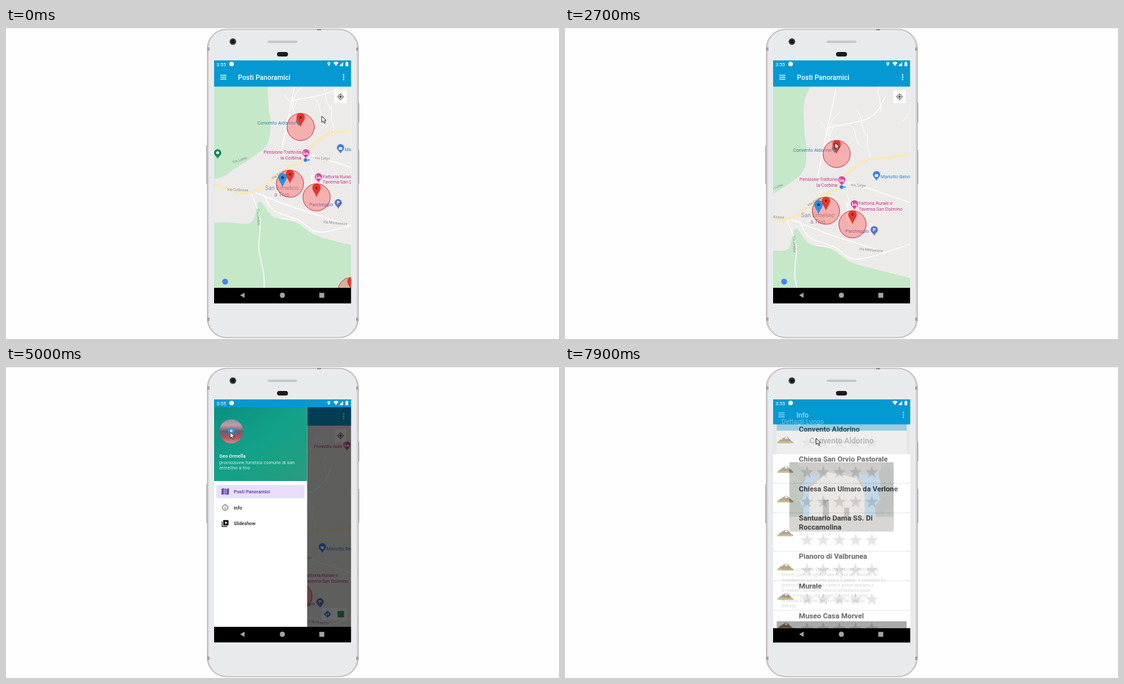
These frames come from a looping animation (853 px wide and 480 px high, 8 s). An HTML page:

```html
<!DOCTYPE html>
<html lang="it">
<head>
<meta charset="utf-8">
<title>Map app</title>
<style>
html, body { margin: 0; width: 100%; height: 100%; overflow: hidden; background: #fefefe; }
svg { display: block; font-family: Roboto, "Liberation Sans", sans-serif; }
.line { fill: none; stroke: #fff; stroke-linejoin: round; stroke-linecap: round; }
.bold { font-weight: 700; }
.mid { font-weight: 500; }
.end { text-anchor: end; }
.center { text-anchor: middle; }
</style>
</head>
<body>
<svg id="stage" width="853" height="480" viewBox="0 0 853 480"></svg>
<script>
const SCREEN = { x: 321, top: 50, bar: 90.5, nav: 401, bottom: 425.3, w: 211.5 };
const MID = { x: 426.5, y: 237.5 };
const BLUE = '#0499d2';
const NAMES = { app: 'Posti Panoramici', first: 'Convento Aldorino' };

const rect = (x, y, w, h, fill, more = '') =>
  `<rect x="${x}" y="${y}" width="${w}" height="${h}" fill="${fill}" ${more}/>`;
const circle = (x, y, r, fill, more = '') =>
  `<circle cx="${x}" cy="${y}" r="${r}" fill="${fill}" ${more}/>`;
const text = (x, y, size, fill, words, cls = '', more = '') =>
  `<text x="${x}" y="${y}" font-size="${size}" fill="${fill}" class="${cls}" ${more}>${words}</text>`;
const path = (d, fill) => `<path d="${d}" fill="${fill}"/>`;
const line = (d, width = 1, stroke = '#fff') =>
  `<path class="line" d="${d}" style="stroke:${stroke};stroke-width:${width}"/>`;
const group = (id, body, more = '') => `<g id="${id}" ${more}>${body}</g>`;
const band = (y, end, fill, more) => rect(SCREEN.x, y, SCREEN.w, end - y, fill, more);
const repeat = (n, make) => Array.from({ length: n }, (_, i) => make(i)).join('');

// Smooth path through a few "x,y" points
function spline(list) {
  const p = list.split(' ').map(s => s.split(',').map(Number));
  const at = i => p[Math.max(0, Math.min(p.length - 1, i))];
  const handle = (i, sign) => at(i).map((v, k) => v + sign * (at(i + 1)[k] - at(i - 1)[k]) / 6);
  return p.map((q, i) => i ? `C${handle(i - 1, 1)} ${handle(i, -1)} ${q}` : `M${q}`).join('');
}

function seeded(seed) {
  return () => (seed = (seed * 16807) % 2147483647) / 2147483647;
}

// Teardrop with its tip at (x, y)
function pin(x, y, r, h, fill) {
  const c = y - h + r;
  return path(`M${x} ${y}C${x - r * .25} ${y - h * .3} ${x - r} ${c + r * .8} ${x - r} ${c}` +
    `A${r} ${r} 0 0 1 ${x + r} ${c}C${x + r} ${c + r * .8} ${x + r * .25} ${y - h * .3} ${x} ${y}Z`, fill);
}

function star(x, y, r) {
  const d = Array.from({ length: 10 }, (_, i) => {
    const a = Math.PI * (i / 5 - .5), s = i % 2 ? r * .42 : r;
    return `${(x + s * Math.cos(a)).toFixed(1)} ${(y + s * Math.sin(a)).toFixed(1)}`;
  });
  return path(`M${d.join('L')}Z`, '#d9d9d9');
}

function phone() {
  const key = (x, y, h) => rect(x, y, 2, h, '#b9b0b2', 'rx="1"');
  return rect(0, 0, 853, 1, '#eeeeee') +
    key(308.8, 181, 60) + key(543, 115, 31) + key(543, 188, 53) +
    rect(310.5, 2, 233, 476, '#d9d3d5', 'rx="29" stroke="#b3abae"') +
    rect(314, 4, 226, 472, '#e8ebed', 'rx="26" stroke="#f3f2f3"') +
    [30, 447].map(y => rect(310, y, 4, 5, '#aaa3a6') + rect(540, y, 4, 5, '#aaa3a6')).join('') +
    rect(480, 1.8, 6, 1.6, '#777') + rect(403.5, 19.5, 46, 3.4, '#c4c6c9', 'rx="1.7"') +
    rect(418, 37, 17, 7, '#1c1c1e', 'rx="3.5"') +
    circle(350, 21, 5.2, '#54565a') + circle(350, 21, 3.5, '#17181b');
}

function land() {
  const green = '#c4e8c8', rnd = seeded(42);
  const lanes = repeat(14, () => {
    let x = 400 + rnd() * 160, y = 10 + rnd() * 290, a = rnd() * 6.3;
    const points = [];
    for (let i = 0; i < 5; i++) {
      points.push(`${x.toFixed(1)},${y.toFixed(1)}`);
      a += rnd() - .5;
      x += 11 * Math.cos(a);
      y += 11 * Math.sin(a);
    }
    return line(spline(points.join(' ')), 1);
  });
  const streets = [
    '378,255 392,295 390,340 398,385 397,440',
    '397,256 412,281 450,296 488,315 568,292',
    '385,254 430,272 478,288 530,305',
    '463,-30 452,58 441,110 425,190',
    '441,112 505,97 530,64',
    '463,194 507,207 568,228'
  ];
  const main = spline('280,231 332,245 362,254 390,249 430,219 456,206 470,184 500,162 530,159 600,148');
  return rect(280, -30, 320, 470, '#ecebea') + lanes +
    path(spline('480,-30 433,28 406,66 405,120 408,145 403,179 376,202 354,216 330,231 280,237') + 'V-30Z', green) +
    path(spline('280,301 340,300 378,300 391,268 412,291 447,300 478,320 532,335 600,352') + 'V440H280Z', green) +
    streets.map(s => line(spline(s), 1.4)).join('') +
    line(main, 3.2, '#f4dda0') + line(main, 2.4, '#fdebb4');
}

function labels() {
  const pink = '#c63683', grey = '#8d8f92';
  const place = (x, y, fill) => pin(x, y, 5.6, 15, fill);
  const way = (x, y, turn, words) =>
    text(x, y, 5.6, '#85888d', words, '', `transform="rotate(${turn} ${x} ${y})"`);
  const inn = (x, y) => place(x, y + 8, '#e0479a') +
    line(`M${x - 3} ${y - 3.4}v5M${x - 3} ${y + .6}h6v1.2M${x - .5} ${y - 1}h3.3v1.5`);
  return place(326.5, 202, '#12865a') + circle(326.5, 192.5, 2.3, '#fff') +
    pin(452, 152, 5, 13, '#2a9aae') + text(446.5, 149, 7.2, '#2789a8', NAMES.first, 'end') +
    inn(462.5, 194) + text(455.5, 194.3, 7.2, pink, 'Pensione Trattoria', 'end') +
    text(455.5, 203, 7.2, pink, 'la Corbina', 'end') +
    inn(482, 231) + text(488.5, 231.5, 7.2, pink, 'Fattoria Rurale e') +
    text(488.5, 240, 7.2, pink, 'Taverna San Dolmino') +
    inn(554, 28.5) + text(546.5, 32.5, 7.2, pink, 'Florentis Aula', 'end') +
    place(516, 194, '#3b82e0') + rect(513.4, 184, 5.2, 4, '#fff', 'rx="1"') +
    text(522.5, 190, 7.2, '#2f7fcf', 'Mariotto Belvino') +
    place(512.5, 279, '#5876bd') + text(512.5, 272.3, 7, '#fff', 'P', 'bold center') +
    text(468, 274.8, 7.2, '#4b6cb4', 'Parcheggio') +
    way(341, 251, 2, 'Via Collinosa') + way(411, 234, -32, 'Via Salgo') + way(476, 202, 4, 'Via Salgo') +
    way(489, 301, 5, 'Via Morbanese') + way(387, 279, 88, 'Via Ombre') + way(350, 209, -18, 'Via Lume') +
    text(425.5, 250, 8.8, grey, 'San Ermelino', 'center') + text(425.5, 260, 8.8, grey, 'a Tivo', 'center');
}

const me = { x: 462, y: 203.8 };
const sights = [[454.5, 152.7, 8], [438, 240.3, 9], [479, 261.3, 9], [533, 406, 9]];
const chosen = { x: sights[0][0], y: sights[0][1] };

function markers() {
  return circle(me.x, me.y, 3.2, '#357be8', 'stroke="#fff" stroke-width=".6"') +
    path(`M${me.x + 4} ${me.y - 1.8}l3 1.8l-3 1.8z`, '#357be8') +
    sights.map(([x, y]) => circle(x, y, 21, '#ff5050', 'fill-opacity=".38" stroke="#d8323c"')).join('') +
    pin(426.5, 246, 6.5, 22, '#2b8fe0') + circle(426.5, 231, 2.2, '#183a63') +
    sights.map(([x, y, n]) => pin(x, y, 6.5, 21.5, '#e2372f') +
      text(x, y - 12.8, 6, '#54100e', n, 'bold center')).join('') +
    group('balloon', rect(chosen.x - 33.5, 109.5, 67, 13, '#fff', 'rx=".8" stroke="#c9c9c9" stroke-width=".5"') +
      path(`M${chosen.x - 3} 122.3h6l-3 3.2z`, '#fff') +
      text(chosen.x, 118.6, 6.9, '#151515', NAMES.first, 'bold center'));
}

function toolbar(title, menu = true) {
  const icons = repeat(3, i => rect(330.5, 72.4 + i * 3, 9.5, 1.2, '#fff') + circle(520.7, 72.4 + i * 3.6, 1.15, '#fff'));
  return band(SCREEN.top, SCREEN.bar, BLUE) + (menu ? icons : '') +
    text(menu ? 357.8 : 329, 80, 10.6, '#fff', title, 'mid');
}

// Every page carries its own black navigation strip
const page = (id, body, bar) => group(id, band(SCREEN.bar, SCREEN.nav, '#fff') + body + bar +
  band(SCREEN.nav, SCREEN.bottom, '#000'));

function mapPage() {
  return group('mapWrap', group('map', land() + labels() + markers()), 'clip-path="url(#body)"') +
    rect(506.5, 96, 19, 20, '#fff', 'fill-opacity=".9"') +
    circle(516, 106, 3.7, 'none', 'stroke="#666"') + circle(516, 106, 1.9, '#555') +
    line('M516 101v1M516 110v1M511 106h1M520 106h1', 1, '#666') +
    circle(338, 391.5, 4.5, '#4285f4') +
    group('tools', rect(487, 372, 39, 19, '#fff', 'fill-opacity=".9"') +
      rect(492, 377.5, 8, 8, '#2b7de1', 'rx="1" transform="rotate(45 496 381.5)"') +
      line('M494 383.6v-2.6h3.8M496.6 379.2l1.7 1.8l-1.7 1.8') + rect(511.5, 376.5, 10, 10, '#34a05a'));
}

function hill(x, y) {
  const rnd = seeded(9);
  const ridge = repeat(9, i => `L${x - 12 + i * 3} ${(y + 4 - 9 * Math.sin(Math.PI * i / 8) * (.75 + rnd() * .3)).toFixed(1)}`);
  return path(`M${x - 12} ${y + 4}${ridge}Z`, '#8d7468') +
    path(`M${x + 1} ${y - 6}l3 4l-3 1l-2-1zM${x - 6} ${y - 3}l2 2l-3 1z`, '#f1ebe8') +
    rect(x - 12, y + 2.6, 24, 2, '#c3a53a') + rect(x - 12, y + 4.2, 24, 1, '#7c9a3e');
}

function listRows() {
  const rows = [
    [NAMES.first], ['Chiesa San Orvio Pastorale'], ['Chiesa San Ulmaro da Verlone'],
    ['Santuario Dama SS. Di', 'Roccamolina'], ['Pianoro di Valbrunea'], ['Murale'], ['Museo Casa Morvel']
  ];
  let y = SCREEN.bar, out = band(y, y + 44.5, '#e6e6e6', 'id="press"');
  for (const lines of rows) {
    const extra = (lines.length - 1) * 13.4;
    out += lines.map((words, i) => text(361.7, y + 11.8 + i * 13.3, 11.1, '#1d1d1d', words, 'bold')).join('') +
      repeat(5, i => star(374 + i * 24.65, y + 28.2 + extra, 10.3)) + hill(341, y + 23.5 + extra / 2);
    y += 45 + extra;
    out += band(y - .8, y + .4, '#e3e3e3');
  }
  return out;
}

function photo() {
  const rnd = seeded(5);
  const tree = (x, y) => circle(x, y, 14 + rnd() * 8, ['#4a5749', '#3d4a44', '#5b5f52'][Math.floor(rnd() * 3)]);
  return `<g clip-path="url(#photo)">` + rect(342, 142, 169, 113, '#4f86b8') + rect(342, 142, 169, 20, '#6a6763') +
    repeat(7, i => tree(342 + i % 2 * 8, 150 + i * 14) + tree(511 - i % 2 * 8, 150 + i * 14)) +
    path('M374 184L404 156L452 166L464 188V234H374Z', '#bdb4ac') +
    line('M369 186L404 156L452 166L466 189', 4, '#7c716d') +
    rect(396, 203, 10, 30, '#4a4544') + rect(431, 216, 8, 17, '#65413a') +
    rect(342, 231, 169, 24, '#8a837b') + '</g>';
}

function detail() {
  const lines = [
    'Antico convento fondato dai monaci, detti anche',
    'eremiti, perché ispirati alla regola del silenzio, si',
    'insediarono sul monte sopra il paese. Il convento fu',
    'diretto da personalità come il priore anziano e',
    'il maestro dei canti. Intorno all\'abbazia ebbe',
    'origine il borgo, che prese il nome dal rione',
    'di pietra, in attesa dei profughi dal mondo',
    'dell\'est.'
  ];
  return text(MID.x, 111, 12.6, '#555', NAMES.first, 'mid center') + photo() +
    lines.map((s, i) => text(329, 319.5 + i * 8.4, 7.4, '#888', s)).join('');
}

function drawer() {
  const item = (y, words, fill = '#1c1c1c') => text(351.3, y, 7.3, fill, words, 'mid');
  return rect(321, 62, 143.5, 339, '#fff') + rect(321, 62, 143.5, 114, 'url(#teal)') +
    circle(347.5, 99.3, 18.5, 'url(#dusk)') + pin(347.5, 110, 5, 16.5, '#2795dc') + circle(347.5, 98.5, 1.9, '#d9e9f2') +
    text(329, 140.2, 7.3, '#fff', 'Geo Ormella', 'mid') +
    text(329, 149.8, 7.3, '#cfeae3', 'promozione turistica comune di san') +
    text(329, 158.3, 7.3, '#cfeae3', 'ermelino a tivo') +
    rect(324.5, 182, 136, 20.5, '#e9dffb', 'rx="2"') +
    repeat(3, i => path(`M${332.4 + i * 4} ${188 - i % 2}l3.5 ${i % 2 * 2 - 1}v9.6l-3.5 ${1 - i % 2 * 2}z`, i % 2 ? '#8377bf' : '#5f4fa8')) +
    item(195, NAMES.app, '#4a37a0') +
    circle(338, 217, 4.2, 'none', 'stroke="#444"') + line('M338 216.8v2M338 214.8v.1', 1, '#444') + item(219.6, 'Info') +
    line('M333.3 238.5v7.6h7.6', 1.1, '#111') + rect(335, 236.3, 8.2, 8.2, '#111', 'rx=".6"') +
    path('M338 238.2l3.4 2.2l-3.4 2.2z', '#fff') + item(244.2, 'Slideshow');
}

function chrome() {
  const soft = '#a3a3a3';
  return text(324.7, 58.6, 7.6, '#fff', '3:55') + circle(348, 55.6, 3.5, '#fff') +
    group('gps', pin(498, 59, 2.2, 6.5, '#fff') + circle(498, 54.7, .9, BLUE)) +
    path('M505 53.6Q509 50.6 513 53.6L509 58.8Z', '#fff') + path('M514 58.8l6-6.4v6.4z', '#fff') +
    rect(523.8, 52.8, 4, 6.2, '#fff', 'rx=".6"') + rect(524.9, 52, 1.8, 1.2, '#fff') +
    path('M361 412.5l7-3.9v7.8z', soft) + circle(426.3, 412.5, 3.9, soft) + rect(483.3, 408.8, 7.6, 7.6, soft);
}

const clip = (id, shape) => `<clipPath id="${id}">${shape}</clipPath>`;
const gradient = (id, dir, ...colors) => `<linearGradient id="${id}" ${dir}>` +
  colors.map((c, i) => `<stop offset="${i / (colors.length - 1)}" stop-color="${c}"/>`).join('') + '</linearGradient>';

document.getElementById('stage').innerHTML =
  '<defs>' + clip('body', band(SCREEN.bar, SCREEN.nav)) + clip('screen', band(SCREEN.top, SCREEN.bottom)) +
  clip('photo', rect(342, 142, 169, 113)) +
  gradient('teal', 'x2="1" y2="1"', '#0c8f80', '#12a289', '#2b9b7e') +
  gradient('dusk', 'x2="0" y2="1"', '#8d91a8', '#c99aa0', '#5b6277', '#b3525c', '#d08a8c') + '</defs>' +
  phone() + '<g clip-path="url(#screen)">' +
  page('mapPage', mapPage(), toolbar(NAMES.app)) +
  page('listPage', listRows(), toolbar('Info')) +
  group('scrim', band(62, SCREEN.nav, '#000')) + group('drawer', drawer()) +
  page('detail', detail(), toolbar('Dettagli Luogo', false)) + '</g>' + chrome() +
  group('cursor', '<path d="M0 0V9.6L2.3 7.5L4 11.2L5.6 10.5L4 6.9H6.9Z" fill="#fff" stroke="#222" stroke-width=".9"/>');

const el = {};
document.querySelectorAll('#stage [id]').forEach(n => { el[n.id] = n; });

// Eased progress from 0 to 1
function ease(t, start, length) {
  const p = Math.max(0, Math.min(1, (t - start) / length));
  return p * p * (3 - 2 * p);
}

// Goes from place to place; each move is { at, for, to }
const travel = (t, from, moves) => moves.reduce((pos, m) => {
  const e = ease(t, m.at, m.for);
  return { x: pos.x + (m.to.x - pos.x) * e, y: pos.y + (m.to.y - pos.y) * e };
}, from);

const focus = p => ({ x: MID.x - p.x, y: 245.5 - p.y });
const PAN = [{ at: 1000, for: 465, to: focus(me) }, { at: 2800, for: 600, to: focus(chosen) }];
const POINTER = [
  { at: 0, for: 800, to: { x: 509, y: 107 } },
  { at: 1500, for: 1000, to: { x: 416.5, y: 177 } },
  { at: 3200, for: 1000, to: { x: 342, y: 78 } },
  { at: 4800, for: 800, to: { x: 366.3, y: 221.5 } },
  { at: 6700, for: 800, to: { x: 387.3, y: 110 } }
];

const show = (node, on) => node.setAttribute('display', on ? 'inline' : 'none');
const move = (node, p) => node.setAttribute('transform', `translate(${p.x} ${p.y})`);
const zoom = (node, s) =>
  node.setAttribute('transform', `translate(${MID.x} ${MID.y}) scale(${s}) translate(${-MID.x} ${-MID.y})`);

function draw(t) {
  const open = ease(t, 4500, 300) - ease(t, 5900, 300), info = t >= 6000, picked = t >= 2800;
  move(el.cursor, travel(t, { x: 487, y: 136 }, POINTER));
  move(el.map, travel(t, { x: 0, y: 0 }, PAN));
  show(el.balloon, picked);
  show(el.tools, picked);
  show(el.mapPage, !info);
  show(el.listPage, info);
  show(el.gps, !info);
  show(el.press, t >= 7700);
  move(el.drawer, { x: (open - 1) * 143.5, y: 0 });
  show(el.drawer, open > 0);
  el.scrim.setAttribute('opacity', open * .6);

  const fade = Math.max(0, (t - 7800) / 300);
  show(el.detail, fade > 0);
  el.detail.setAttribute('opacity', fade);
  zoom(el.detail, 1 - .15 * Math.pow(1 - fade, 2.6));
  zoom(el.listPage, 1 + .04 * fade);
}

const start = performance.now();
function tick() {
  draw(Math.floor((performance.now() - start) % 8000 / 100) * 100);
  requestAnimationFrame(tick);
}
tick();
</script>
</body>
</html>
```
